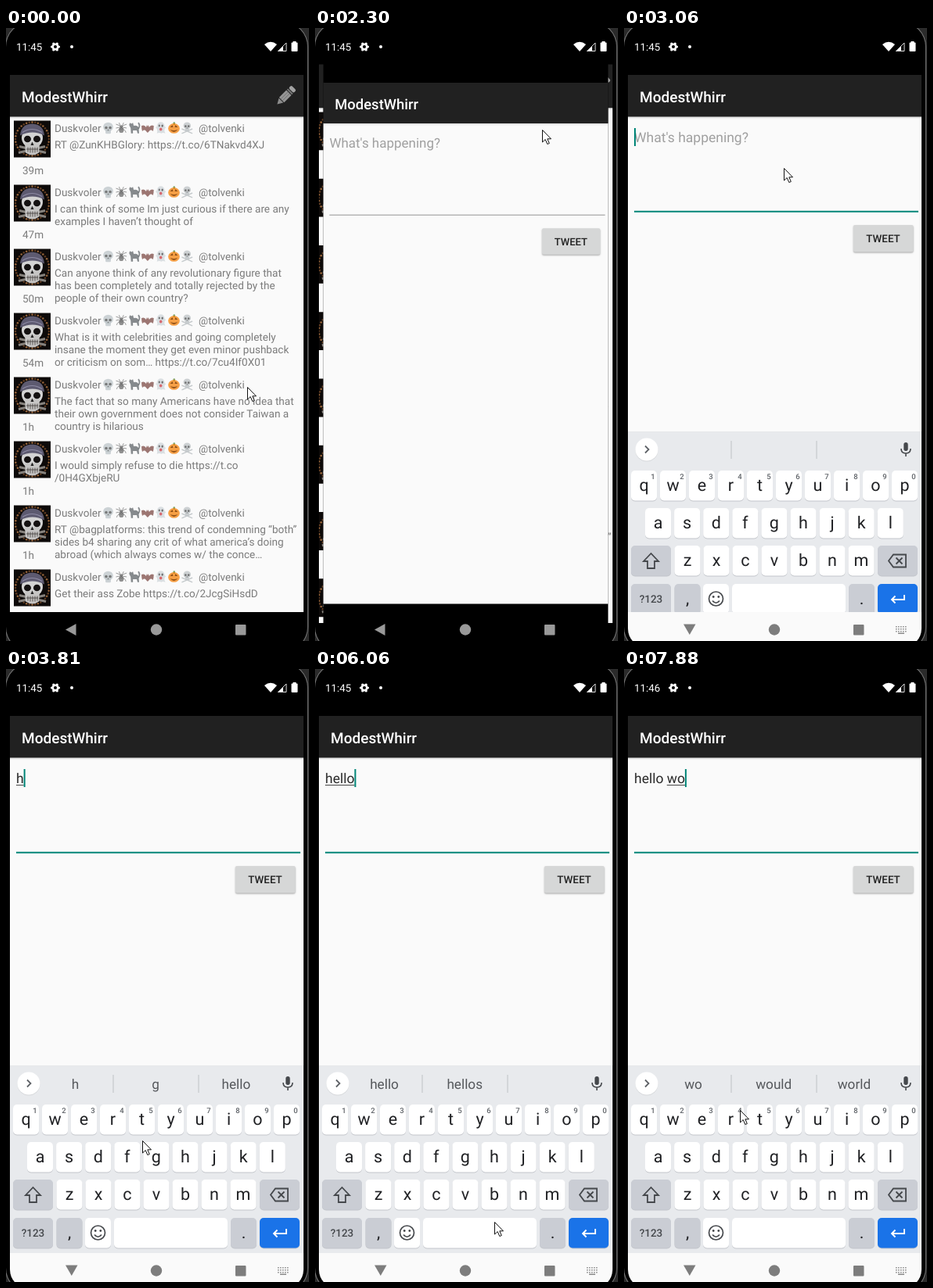
An HTML page with a canvas for the animation above (8 s loop, 387 by 784 pixels).

```html
<!DOCTYPE html>
<html lang="en">
<head>
<meta charset="utf-8">
<title>Posting a message</title>
<style>
html, body { margin: 0; height: 100%; overflow: hidden; background: #000; }
canvas { display: block; width: 100vw; height: 100vh; }
</style>
</head>
<body>
<canvas id="stage" width="387" height="784"></canvas>
<script>
const ctx = document.getElementById('stage').getContext('2d');
const LOOP = 8000, TEAL = '#008577', PAPER = '#fafafa';

// Pointer tip over time: [ms, x, y]
const POINTER = [
  [0, 308, 459], [280, 311, 420], [400, 322, 300], [520, 329, 190], [640, 331, 151],
  [780, 334, 138], [900, 345, 108], [1020, 356, 79], [1140, 357, 84], [1770, 358, 84],
  [2180, 340, 95], [2300, 290, 130], [2420, 230, 165], [2540, 204, 179],
  [3200, 205, 200], [3320, 210, 320], [3440, 218, 480], [3570, 225, 600], [3690, 226, 617],
  [3810, 174, 603], [3930, 100, 583], [4070, 93, 581], [4340, 140, 583], [4460, 228, 586],
  [4610, 300, 602], [4730, 362, 609], [4880, 345, 615], [5000, 350, 617],
  [5530, 345, 604], [5670, 330, 580], [5790, 310, 600], [5910, 245, 694], [6060, 229, 707],
  [6470, 180, 670], [6590, 110, 620], [6710, 70, 585], [6950, 150, 580], [7070, 262, 579],
  [7210, 270, 580], [7370, 307, 581], [7510, 325, 580], [7630, 300, 578], [7760, 220, 570], [7880, 148, 564]
];
// Typed text: [ms, finished words, word in progress, suggestions]
const TYPING = [
  [2700, '', '', []],
  [3690, '', 'h', ['h', 'g', 'hello']],
  [4190, '', 'he', ['he', 'hello', 'her']],
  [5000, '', 'hel', ['hel', 'hello', 'help']],
  [5410, '', 'hell', ['hell', 'hello', 'he’ll']],
  [5670, '', 'hello', ['hello', 'hellos', '']],
  [6210, 'hello ', '', []],
  [6350, 'hello ', '', ['my', 'and', 'there']],
  [6830, 'hello ', 'w', ['w', 'what', 'with']],
  [7510, 'hello ', 'wo', ['wo', 'would', 'world']]
];
const OPENING = [[2180, .25], [2300, .8], [2420, .95], [2540, 1]];
const SLIDE = [[2700, 276], [2820, 190], [2940, 55], [3060, 9], [3200, 0]];
const POSTS = [
  ['39m', 'RT @ZunKHBGlory: https://t.co/6TNakvd4XJ'],
  ['47m', 'I can think of some Im just curious if there are any', 'examples I haven’t thought of'],
  ['50m', 'Can anyone think of any revolutionary figure that', 'has been completely and totally rejected by the', 'people of their own country?'],
  ['54m', 'What is it with celebrities and going completely', 'insane the moment they get even minor pushback', 'or criticism on som… https://t.co/7cu4If0X01'],
  ['1h', 'The fact that so many Americans have no idea that', 'their own government does not consider Taiwan a', 'country is hilarious'],
  ['1h', 'I would simply refuse to die https://t.co', '/0H4GXbjeRU'],
  ['1h', 'RT @bagplatforms: this trend of condemning “both”', 'sides b4 sharing any crit of what america’s doing', 'abroad (which always comes w/ the conce…'],
  ['1h', 'Get their ass Zobe https://t.co/2JcgSiHsdD']
];

const current = (steps, t) => steps.findLast(s => s[0] <= t);

function rect(x, y, w, h, color, r = 0) {
  ctx.fillStyle = color;
  ctx.beginPath();
  ctx.roundRect(x, y, w, h, r);
  ctx.fill();
}
function oval(x, y, rx, ry, color) {
  ctx.fillStyle = color;
  ctx.beginPath();
  ctx.ellipse(x, y, rx, ry, 0, 0, 7);
  ctx.fill();
}
function shape(d, fill, stroke, width = 1) {
  const path = new Path2D(d);
  if (fill) { ctx.fillStyle = fill; ctx.fill(path); }
  if (stroke) { ctx.strokeStyle = stroke; ctx.lineWidth = width; ctx.stroke(path); }
}
function text(s, x, y, size, color, weight = 400, align = 'left') {
  ctx.font = `${weight} ${size}px Roboto, sans-serif`;
  ctx.textRendering = 'geometricPrecision';
  ctx.textAlign = align;
  ctx.fillStyle = color;
  ctx.fillText(s, x, y);
  return ctx.measureText(s).width;
}
function at(x, y, draw, scale = 1, alpha = 1) {
  ctx.save();
  ctx.translate(x, y);
  ctx.scale(scale, scale);
  ctx.globalAlpha *= alpha;
  draw();
  ctx.restore();
}
function skull(color, hole) {
  oval(0, -1.5, 6.5, 6, color);
  rect(-3.5, 2, 7, 5.5, color, 1.5);
  oval(-2.6, -.5, 1.8, 1.9, hole);
  oval(2.6, -.5, 1.8, 1.9, hole);
  oval(0, 2.5, .8, .9, hole);
}

const EMOJI = [
  () => skull('#bcc4c8', '#5c5c5c'),
  () => {
    shape('M-7-5Q-3-5 0 0Q3-5 7-5M-7 0Q-4-2 0 1Q4-2 7 0M-6 6Q-5 1 0 2Q5 1 6 6M-3-7L0 0L3-7', null, '#777', 1);
    oval(0, 2.5, 3.2, 3.7, '#6c6c6c');
    oval(0, -2, 2, 1.8, '#6c6c6c');
  },
  () => {
    shape('M-7-4L-6-7L-4-5.5L-2-7L-1-3Q4-4 5.5 0L6 7H4L3 3L-2 3L-2 7H-4.5L-5 0Z', '#5f6468');
    shape('M5 1Q8-3 5-7', null, '#5f6468', 1.8);
  },
  () => shape('M-8-3Q-4-5-2-1L-1-4L0-2L1-4L2-1Q4-5 8-3Q8 1 7 4Q4 1 2 4L0 6L-2 4Q-4 1-7 4Q-8 1-8-3Z', '#7c4a44'),
  () => {
    shape('M-5 7Q-4 4-5 1L-7-1Q-5-1-5-3Q-4-8 0-8Q4-8 5-3Q5-1 7-1L5 1Q4 4 6 7Q2 5 1 7Q-2 5-5 7Z', '#cfd6da');
    oval(-2, -3, 1, 1.5, '#444');
    oval(2, -3, 1.2, 1.7, '#444');
    oval(0, 1.5, 1.8, 2, '#d6404a');
  },
  () => {
    rect(-1, -8, 2.5, 4, '#5c8a3a', 1);
    oval(0, .5, 7.5, 6.5, '#f5820a');
    shape('M-5-1L-2-4L-1-1ZM5-1L2-4L1-1ZM-5 2Q0 4 5 2Q0 8-5 2Z', '#713707');
  },
  () => {
    shape('M-7 1L7 7M7 1L-7 7', null, '#b5bbbe', 1.5);
    at(0, -2, () => skull('#bcc2c5', '#555'), .75);
  }
];

function avatar() {
  rect(0, 0, 47, 47, '#0d0a09');
  for (let i = 0; i < 36; i++) {
    const a = i * Math.PI / 18;
    oval(23.5 + 21.5 * Math.cos(a), 23.5 + 21.5 * Math.sin(a), 1.3, 1.3, i % 2 ? '#96643a' : '#5d3a20');
  }
  shape('M6 41L40 33M41 41L7 33', null, '#85817c', 3);
  oval(23.5, 22, 13.5, 13, '#d3d3d3');
  shape('M14 28H33L32 41Q24 47 15 41Z', '#c6c5c4');
  shape('M8 19Q9 4 24 4Q38 5 39 19Q24 11 8 19Z', '#5d5a70');
  shape('M11 15Q23 7 36 15', null, '#8d8aa4', 1.2);
  oval(17.5, 23.5, 4.5, 4.3, '#151212');
  oval(29.5, 23.5, 4.5, 4.3, '#151212');
  shape('M23.5 27L21.5 31.5H25.5Z', '#222');
  shape('M16 36.5H31M18 34V40M21 34V41M24 34V41M27 34V41M30 34V40', null, '#4a4644', .9);
}

function pencil() {
  ctx.rotate(-Math.PI / 4);
  shape('M-15 0L-8-4V4Z', '#8c8c8c');
  rect(-7, -4.5, 13, 9, '#969696');
  shape('M-7-1.5H6M-7 1.5H6', null, '#6e6e6e', .8);
  rect(7, -4.5, 2, 9, '#777');
  rect(10, -4.5, 5, 9, '#a2a2a2', 2);
}

function appWindow() {
  rect(5, 0, 375, 784, '#000');
  rect(5, 113, 375, 634, PAPER);
  rect(5, 60, 375, 53.5, '#212121');
  const shade = ctx.createLinearGradient(0, 113.5, 0, 116.5);
  shade.addColorStop(0, '#0002');
  shade.addColorStop(1, '#0000');
  rect(5, 113.5, 375, 3, shade);
  text('ModestWhirr', 20, 95, 19, '#fff', 500);
}

function feed() {
  appWindow();
  at(357, 87, pencil);
  ctx.save();
  ctx.beginPath();
  ctx.rect(5, 113, 375, 634);
  ctx.clip();
  POSTS.forEach(([age, ...lines], i) => at(0, 113 + 82 * i, () => {
    const gray = '#7b7b7b';
    at(10, 5.5, avatar);
    text('Duskvoler', 62, 20, 13.55, gray);
    EMOJI.forEach((draw, k) => at(130.5 + 16.8 * k, 15, draw, .98, .75));
    text('@tolvenki', 246, 20, 13.55, gray);
    lines.forEach((s, k) => text(s, 62, 41 + 16 * k, 13.55, gray));
    text(age, 21, 74, 13.55, gray);
  }));
  ctx.restore();
}

function compose(t) {
  appWindow();
  const entry = current(TYPING, t);
  rect(13, 233.7, 363, entry ? 2 : 1.4, entry ? TEAL : '#b5b5b5');
  ctx.save();
  ctx.shadowColor = '#0005';
  ctx.shadowBlur = 2;
  ctx.shadowOffsetY = 1;
  rect(293, 252, 76.5, 34.5, '#d6d7d7', 2);
  ctx.restore();
  text('TWEET', 331, 274, 13.4, '#212121', 500, 'center');

  const [since, done, word] = entry || [0, '', ''];
  const size = 17.5;
  if (!done && !word) text('What\'s happening?', 13, 146, size, '#a0a0a0');
  const start = 13 + text(done, 13, 146, size, '#2a2a2a');
  const width = text(word, start, 146, size, '#2a2a2a');
  if (word) rect(start, 148, width, 1, '#444');
  if (entry && (t - since) % 1000 < 500) rect(start + width, 128, 2, 23, TEAL);
}

function key(x, y, w, label, color = '#fff') {
  rect(x, y + 1, w, 38.5, '#c3c6cb', 5);
  rect(x, y, w, 38.5, color, 5);
  text(label, x + w / 2, y + 26, 21.5, '#202124', 400, 'center');
}

function keyboard(t) {
  const SPECIAL = '#cacdd4', INK = '#45484c';
  rect(5, 507, 375, 1, '#e6e8ea');
  rect(5, 508, 375, 276, '#e8eaed');
  oval(29, 531, 14.5, 14.5, '#d5d7da');
  oval(29, 530, 14.5, 14.5, '#fff');
  shape('M27 525.5L31.5 530L27 534.5', null, '#5f6368', 1.8);
  rect(136.5, 519, 1, 23, '#bdc1c6');
  rect(245.5, 519, 1, 23, '#bdc1c6');
  const words = (current(TYPING, t) || [])[3] || [];
  words.forEach((s, i) => text(s, 88.5 + 102.7 * i, 536.5, 17.2, '#55585c', 400, 'center'));
  rect(357.3, 521, 5.4, 11, INK, 2.7);
  shape('M354 529Q354 535 360 535Q366 535 366 529M360 535V539', null, INK, 1.6);

  [...'qwertyuiop'].forEach((c, i) => {
    key(9 + 37 * i, 557, 33, c);
    text((i + 1) % 10, 37 + 37 * i, 567.5, 9.5, '#5f6368', 500, 'center');
  });
  [...'asdfghjkl'].forEach((c, i) => key(27 + 37.1 * i, 605, 33, c));
  [...'zxcvbnm'].forEach((c, i) => key(64.5 + 37 * i, 653, 33, c));
  key(9, 653, 51, '', SPECIAL);
  key(324, 653, 51, '', SPECIAL);
  key(9, 702, 51, '', SPECIAL);
  key(64.5, 702, 33, ',', SPECIAL);
  key(101, 702, 33, '');
  key(138, 702, 145, '');
  key(287, 702, 33, '.', SPECIAL);
  key(324, 702, 51, '', '#1a73e8');
  text('?123', 34.5, 726, 13.5, INK, 500, 'center');
  shape('M34.5 663L25 673H30V682H39V673H44Z', null, INK, 1.8);
  shape('M344 664.5H360V680.5H344L338 672.5ZM347.5 668.5L355.5 676.5M355.5 668.5L347.5 676.5', null, INK, 1.8);
  shape('M358 716V722H342M346.5 717.5L342 722L346.5 726.5', null, '#fff', 1.9);
  shape('M126.5 721A9 9 0 1 1 108.5 721A9 9 0 1 1 126.5 721M113 723.5Q117.5 729 122 723.5', null, INK, 1.7);
  oval(114.2, 718.5, 1.4, 1.4, INK);
  oval(120.8, 718.5, 1.4, 1.4, INK);

  if (t >= 5260 && t < 5410) {
    rect(322, 539, 38, 108, '#c8cbd0', 6);
    rect(322, 538, 38, 107, '#fff', 6);
    text('l', 341, 577, 28, '#202124', 400, 'center');
  }
}

function statusBar(t) {
  text(t < 6470 ? '11:45' : '11:46', 13, 29, 13.3, '#fff');
  for (let i = 0; i < 6; i++) {
    const a = i * Math.PI / 3;
    oval(63 + 4.5 * Math.cos(a), 24 + 4.5 * Math.sin(a), 1.6, 1.6, '#fff');
  }
  oval(63, 24, 4.6, 4.6, '#fff');
  oval(63, 24, 2, 2, '#000');
  oval(84, 24, 2, 2, '#fff');
  shape('M338 30L330 21Q338 14.5 346 21Z', '#fff');
  shape('M347 30L354 23V30Z', '#fff');
  shape('M347.5 29.5L358 19V29.5Z', null, '#ddd', 1);
  rect(364.5, 18.5, 8, 11.5, '#fff', 1);
  rect(366.5, 17, 4, 2, '#fff');
}

function navBar(light) {
  const color = light ? '#7d7d7d' : '#999';
  if (light) {
    rect(5, 747, 375, 45, PAPER, [0, 0, 22, 22]);
    for (let i = 0; i < 15; i++) rect(347 + 3 * (i % 5), 765 + 3 * (i / 5 | 0), 1.6, 1.6, '#8c8c8c');
    rect(350, 773.5, 8, 1.4, '#8c8c8c');
  }
  shape(light ? 'M76 762.5H91.5L83.8 776Z' : 'M76 769.5L89.5 762V777Z', color);
  oval(192, 769.5, 7.2, 7.2, color);
  rect(293, 763, 13.5, 13.5, color, 1);
}

function phoneBody() {
  rect(0, 0, 387, 784, '#2b2b2b');
  rect(-1, -8, 387, 806, '#777', 32);
  rect(0, -7, 385, 804, '#000', 31);
}

function scaled(amount, alpha, draw) {
  at(192.5, 396, () => { ctx.translate(-192.5, -396); draw(); }, amount, alpha);
}

function render(t) {
  phoneBody();
  ctx.save();
  ctx.beginPath();
  ctx.roundRect(5, -4, 375, 796, 24);
  ctx.clip();
  const opening = (current(OPENING, t) || [0, 0])[1];
  if (opening < 1) scaled(1 + .05 * opening, 1, feed);
  if (opening > 0) scaled(.85 + .15 * opening, Math.min(1, opening * 2.4), () => compose(t));
  const slide = current(SLIDE, t);
  if (slide) at(0, slide[1], () => keyboard(t));
  const light = t >= 2820;
  if (light) rect(5, 747, 375, 37, '#000');
  navBar(light);
  statusBar(t);
  ctx.restore();

  const [, x, y] = current(POINTER, t);
  at(x + .5, y + .5, () => shape('M0 0V15.5L3.7 12L6.3 18L8.8 17L6.3 11.3H11Z', '#fff', '#111', 1));
}

function frame() {
  render(performance.now() % LOOP);
  requestAnimationFrame(frame);
}
frame();
</script>
</body>
</html>
```
